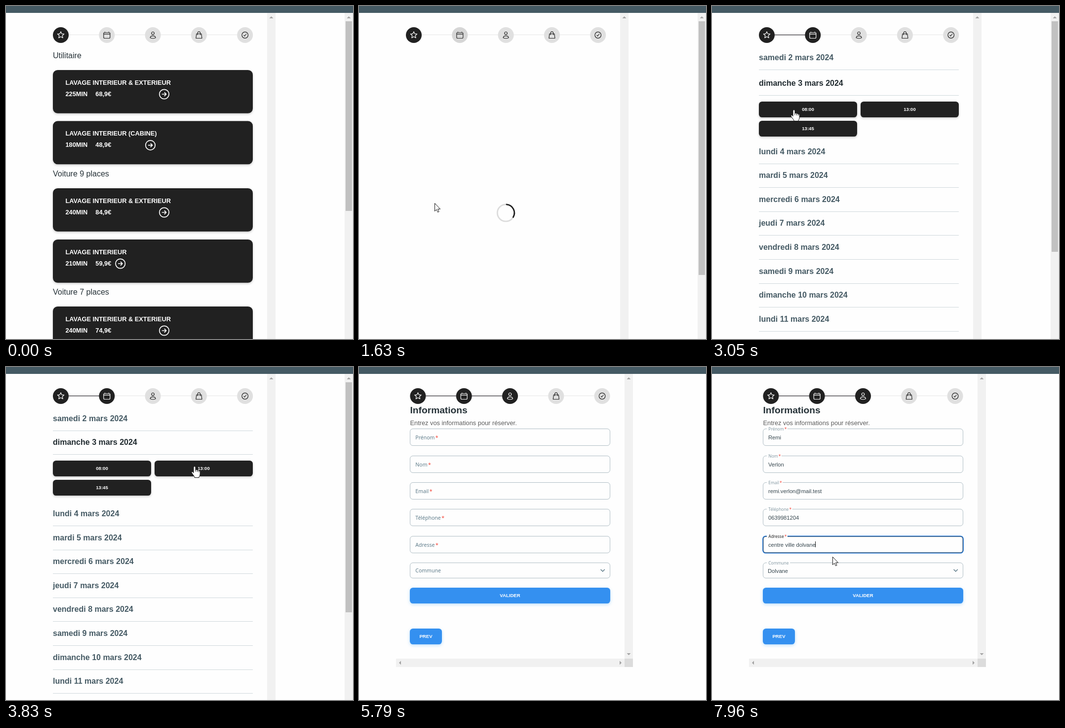
These frames come from a looping animation (703 by 676 pixels, 8000 ms). An HTML page:

```html
<!DOCTYPE html>
<html lang="fr">
<head>
<meta charset="utf-8">
<title>Réservation</title>
<style>
html, body { margin: 0; width: 100%; height: 100%; overflow: hidden; background: #fefefe; }
svg { display: block; }
text { font-family: Arial, "Liberation Sans", sans-serif; white-space: pre; }
.b { font-weight: bold; }
.label { font-family: "Segoe UI", "Open Sans", sans-serif; font-size: 10.5px; }
.dark { filter: drop-shadow(0 2px 2px rgba(0,0,0,.2)); }
.blue { filter: drop-shadow(0 2px 3px rgba(33,150,243,.3)); }
</style>
</head>
<body>
<svg id="stage" width="703" height="676"></svg>
<script>
const stage = document.getElementById('stage');

function el(tag, attrs, parent = stage, text) {
  const node = document.createElementNS('http://www.w3.org/2000/svg', tag);
  set(node, attrs);
  if (text) node.textContent = text;
  return parent.appendChild(node);
}
function set(node, attrs) {
  for (const key in attrs) node.setAttribute(key, attrs[key]);
}
const group = (parent, attrs = {}) => el('g', attrs, parent);
const rect = (p, x, y, width, height, fill, more) => el('rect', { x, y, width, height, fill, ...more }, p);
const text = (p, x, y, size, fill, str, more) => el('text', { x, y, 'font-size': size, fill, ...more }, p, str);
const line = (p, d, stroke, width, more) =>
  el('path', { d, stroke, 'stroke-width': width, fill: 'none', 'stroke-linecap': 'round', 'stroke-linejoin': 'round', ...more }, p);
const show = (node, on) => { node.style.display = on ? '' : 'none'; };

const clamp = v => Math.max(0, Math.min(1, v));
const ramp = (t, from, to) => clamp((t - from) / (to - from));
const smooth = p => p * p * (3 - 2 * p);
const outQuad = p => 1 - (1 - p) ** 2;
const lerp = (a, b, p) => a + (b - a) * p;

function scrollArrow(parent, x, y, turn) {
  el('path', { d: 'M-4 2L0-2 4 2Z', fill: '#a3a3a3', transform: `translate(${x} ${y}) rotate(${turn})` }, parent);
}
function button(parent, x, y, width, label, color, cls) {
  rect(parent, x, y, width, 32, color, { rx: 6.4, class: cls });
  return text(parent, x + width / 2, y + 18.5, 9.6, '#fff', label, { class: 'b', 'text-anchor': 'middle' });
}
function spinner(parent, x, y, r, width, track) {
  const g = group(parent, { transform: `translate(${x} ${y})` });
  el('circle', { r, fill: 'none', stroke: track, 'stroke-width': width }, g);
  const a = 2 * Math.PI / 3;
  return line(g, `M${r * .08} ${-r}A${r} ${r} 0 0 1 ${r * Math.sin(a)} ${-r * Math.cos(a)}`, '#212121', width);
}

// page chrome
rect(stage, 0, 0, 703, 14, '#455a64');
const longPage = group();
rect(longPage, 529, 14, 17, 662, '#f1f1f1');
rect(longPage, 686, 14, 17, 662, '#f1f1f1');
scrollArrow(longPage, 537.5, 23, 0);
scrollArrow(longPage, 694.5, 23, 0);
const thumb = rect(longPage, 688, 31, 13, 385, '#c1c1c1');

// stepper
const stepper = group();
rect(stepper, 111, 58, 373, 1, '#e6e6e6');
const doneLine = rect(stepper, 111, 58, 0, 1.3, '#37343a');
const star = Array.from({ length: 10 }, (_, i) => {
  const r = i % 2 ? 3.3 : 7, a = i * Math.PI / 5;
  return (r * Math.sin(a)).toFixed(2) + ' ' + (-r * Math.cos(a)).toFixed(2);
});
const icons = [
  'M' + star.join('L') + 'Z',
  'M-4.5-5H4.5Q6.5-5 6.5-3V4.5Q6.5 6.5 4.5 6.5H-4.5Q-6.5 6.5-6.5 4.5V-3Q-6.5-5-4.5-5ZM-6.5-1.8H6.5M-4-6.3V-5M4-6.3V-5',
  'M0-6.5A2.8 2.8 0 0 1 0-.9A2.8 2.8 0 0 1 0-6.5ZM-5.5 5.5C-5 .3 5 .3 5.5 5.5Q0 8-5.5 5.5Z',
  'M-5-2.5H5L6 6.5H-6ZM-2.8-.5V-4A2.8 2.8 0 0 1 2.8-4V-.5',
  'M0-6.3A6.3 6.3 0 0 1 0 6.3A6.3 6.3 0 0 1 0-6.3ZM-2.3.4L-.7 2 2.4-2'
];
const steps = icons.map((d, i) => {
  const g = group(stepper, { transform: `translate(${111 + i * 93.3} 59)` });
  return { disc: el('circle', { r: 16 }, g), icon: line(g, d, '#212121', 1.2) };
});

// service list
const services = group();
for (const [y, name] of [[106, 'Utilitaire'], [346, 'Voiture 9 places'], [586, 'Voiture 7 places']])
  text(services, 95, y, 16, '#263238', name);
const full = 'LAVAGE INTERIEUR & EXTERIEUR';
const cards = [
  [130, full, '225MIN', '68,9€', 320.5],
  [233.6, 'LAVAGE INTERIEUR (CABINE)', '180MIN', '48,9€', 292.5],
  [370, full, '240MIN', '84,9€', 320.5],
  [474, 'LAVAGE INTERIEUR', '210MIN', '59,9€', 231.7],
  [610, full, '240MIN', '74,9€', 320.5]
];
for (const [y, name, time, price, x] of cards) {
  rect(services, 95, y, 405, 87.7, '#212121', { rx: 9.6, class: 'dark' });
  const top = Math.floor(y), white = { class: 'b' };
  text(services, 120.5, top + 30, 12.8, '#fff', name, white);
  text(services, 120.5, top + 53, 12.8, '#fff', time, white);
  text(services, 181.3, top + 53, 12.8, '#fff', price, white);
  const g = group(services, { transform: `translate(${x} ${y + 49})` });
  el('circle', { r: 9.7, fill: 'none', stroke: '#fff', 'stroke-width': 1.7 }, g);
  line(g, 'M-4 0H4M.8-3.3L4.1 0 .8 3.3', '#fff', 1.7);
}

// loading
const loading = group();
const bigArc = spinner(loading, 297.5, 420, 17.2, 2.8, '#dcdcdc');

// dates accordion
const dates = group();
const days = ['samedi', 'dimanche', 'lundi', 'mardi', 'mercredi', 'jeudi', 'vendredi'];
const rows = Array.from({ length: 11 }, (_, i) => {
  const g = group(dates);
  const label = text(g, 95, 0, 16, '', `${days[i % 7]} ${i + 2} mars 2024`, { class: 'b' });
  rect(g, 95, 19, 405, 1, '#cfd8dc');
  return { g, label };
});
function panel(row, top, hours) {
  const box = el('svg', { x: 0, y: 20, width: 703, height: 0 }, rows[row].g);
  hours.forEach((hour, i) =>
    button(box, 95 + i % 2 * 206, top + (i >> 1) * 39, 199, hour, '#212121', 'dark'));
  return box;
}
const panels = [panel(0, 13, ['13:00']), panel(1, 12, ['08:00', '13:00', '13:45'])];

function layoutDates(open, cursorY) {
  const extra = [57.6 * (1 - open), 96 * open];
  let y = 110.3;
  rows.forEach(({ g, label }, i) => {
    const base = Math.floor(y);
    const active = i === (open > 0 ? 1 : 0) || (cursorY > base - 29 && cursorY < base + 19);
    set(g, { transform: `translate(0 ${base})` });
    set(label, { fill: active ? '#212b30' : '#455a64' });
    if (panels[i]) set(panels[i], { height: extra[i] });
    y += 48.6 + (extra[i] || 0);
  });
}

// form
const form = group();
rect(form, 538, 14, 17, 578, '#f1f1f1');
rect(form, 75, 592, 463, 17, '#f1f1f1');
rect(form, 538, 592, 17, 17, '#dcdcdc');
scrollArrow(form, 546.5, 23, 0);
scrollArrow(form, 546.5, 583, 180);
scrollArrow(form, 83, 600.5, -90);
scrollArrow(form, 530, 600.5, 90);
text(form, 103.5, 94, 19.2, '#263238', 'Informations', { class: 'b' });
text(form, 103.5, 118, 12.8, '#5c5c5c', 'Entrez vos informations pour réserver.');

const fields = [
  [125, 'Prénom', 'Remi'],
  [180, 'Nom', 'Verlon'],
  [234, 'Email', 'remi.verlon@mail.test'],
  [288, 'Téléphone', '0639981204'],
  [343, 'Adresse', 'centre ville dolvane'],
  [397, 'Commune', 'Dolvane']
].map(([y, name, value]) => {
  const select = name === 'Commune', focusable = name === 'Adresse';
  const height = select ? 31 : 34;
  const box = { fill: 'none', rx: 5.6 };
  rect(form, 103.5, y + .5, 405, height, 'none', { ...box, stroke: '#b0bec5' });
  const focus = group(form);
  if (focusable) {
    rect(focus, 103, y + .3, 406, height + .4, 'none', { ...box, stroke: '#2079dc', 'stroke-width': 1.8 });
    rect(focus, 104, y + 1.3, 404, height - 1.6, 'none', { ...box, stroke: '#263238', 'stroke-width': .8, rx: 4.8 });
  }
  const notch = rect(form, 111, y - 1, 10, 3.2, '#fefefe');
  const label = text(form, 0, 0, 10.5, '#607d8b', name, { class: 'label' });
  if (!select) el('tspan', { dx: 1.5, fill: '#f44336' }, label, '*');
  const content = text(form, select ? 113 : 114, y + (select ? 21 : 22), 11.2, '#37474f', value);
  return { y, select, focusable, focus, notch, label, content };
});
const caret = rect(form, 209, 354, 1, 12, '#111');
line(form, 'M490 411.3l3.7 3.7 3.7-3.7', '#607d8b', 1.6);
const submit = button(form, 103, 448, 406, 'VALIDER', '#3490f0', 'blue');
button(form, 103, 531, 65, 'PREV', '#3490f0', 'blue');
const busy = group(form);
const smallArc = spinner(busy, 306.5, 464.3, 6, 1.2, '#b9d7f7');

function layoutForm(t) {
  const p = smooth(ramp(t, 6630, 6860)), filled = t >= 6690;
  for (const f of fields) {
    const focused = f.focusable && filled;
    set(f.label, {
      transform: `translate(114.3 ${f.y + lerp(f.select ? 20 : 22, 4, p)}) scale(${lerp(1, .8, p)})`,
      fill: focused ? '#212121' : p > .5 ? '#8499a3' : '#607d8b'
    });
    set(f.notch, { width: f.label.getComputedTextLength() * .8 + 6, opacity: p });
    show(f.content, filled);
    show(f.focus, focused);
  }
  show(caret, filled && (t < 7240 || t >= 7740));
  const waiting = t < 5400;
  show(busy, waiting);
  show(submit, !waiting);
  set(smallArc, { transform: `rotate(${(t - 4760) * .36})` });
}

// cursor: time, x, y
const path = [
  [110, 595, 662], [890, 153, 401], [1010, 153, 400], [2200, 153, 400], [2510, 165, 210],
  [3100, 166, 210], [3600, 380, 202], [3780, 380, 202], [3830, 382, 201], [4700, 384, 201],
  [4820, 384, 201], [5490, 242, 174], [5790, 202, -22], [7360, 250, -22], [7640, 252, 190], [7960, 244, 385]
];
const cursor = group();
const black = { stroke: '#111', 'stroke-width': 1, fill: '#fff', 'stroke-linejoin': 'round' };
const shapes = {
  arrow: el('path', { d: 'M.5.5V16.5L4 13.2 6.5 18.6 9 17.5 6.6 12.2H11.6Z', ...black }, cursor),
  hand: el('path', {
    d: 'M-2 2Q0-1 2 2V8Q4 6.3 5.5 8.5Q7.3 7 8.7 9.5Q10.8 8.7 11.2 11V16Q11.2 20 9 22V23.5H0V22Q-3 18-6 13.5Q-6.6 11-4 11.5L-2 13.7ZM2 8V11.5M5.5 8.5V12M8.7 9.5V12.5',
    ...black
  }, cursor),
  beam: line(cursor, 'M-3.3-7.5H-.8L0-6.8.8-7.5H3.3M0-6.8V6.8M-3.3 7.5H-.8L0 6.8.8 7.5H3.3', '#111', 1.2)
};

function cursorAt(t) {
  if (t < path[0][0]) return null;
  const next = path.findIndex(k => k[0] > t);
  if (next < 0) return path[path.length - 1].slice(1);
  const [t0, x0, y0] = path[next - 1], [t1, x1, y1] = path[next];
  const p = smooth(ramp(t, t0, t1));
  return [lerp(x0, x1, p), lerp(y0, y1, p)];
}
function cursorShape(view, x, y) {
  const inside = x > 95 && x < 509;
  if (view === services && inside && x < 500 && cards.some(c => y > c[0] && y < c[0] + 88)) return 'hand';
  if (view === dates && inside && y > 85) return 'hand';
  if (view === form && inside && fields.some(f => !f.select && y > f.y && y < f.y + 35)) return 'beam';
  return 'arrow';
}

function draw(t) {
  const view = t < 1440 ? services : t < 2140 ? loading : t < 4700 ? dates : form;
  for (const v of [services, loading, dates, form]) show(v, v === view);
  show(longPage, view !== form);

  const starts = [-1000, 1590, 4860];
  steps.forEach(({ disc, icon }, i) => {
    const p = i < 3 ? smooth(ramp(t, starts[i], starts[i] + 300)) : 0;
    const gray = v => `rgb(${v},${v},${v})`;
    set(disc, { fill: gray(lerp(224, 33, p)) });
    set(icon, { stroke: gray(lerp(33, 255, p)) });
  });
  const reach = smooth(ramp(t, 1590, 2090)) + smooth(ramp(t, 4860, 5360));
  set(doneLine, { width: reach * 93.3 });
  set(stepper, { transform: `translate(${view === form ? 8.4 : 0} 0)` });

  const at = cursorAt(t);
  show(cursor, at);
  if (at) {
    set(cursor, { transform: `translate(${at.map(Math.round).join(' ')})` });
    const shape = cursorShape(view, ...at);
    for (const name in shapes) show(shapes[name], name === shape);
  }

  const open = outQuad(ramp(t, 2810, 3130));
  const bottom = view === services ? 416 : view === loading ? 546 : lerp(517, 498, open);
  set(thumb, { height: Math.round(bottom) - 31 });
  if (view === loading) set(bigArc, { transform: `rotate(${(t - 1630) * .36})` });
  if (view === dates) layoutDates(open, at[1]);
  if (view === form) layoutForm(t);
}

function tick() {
  draw(performance.now() % 8000);
  requestAnimationFrame(tick);
}
tick();
</script>
</body>
</html>
```
